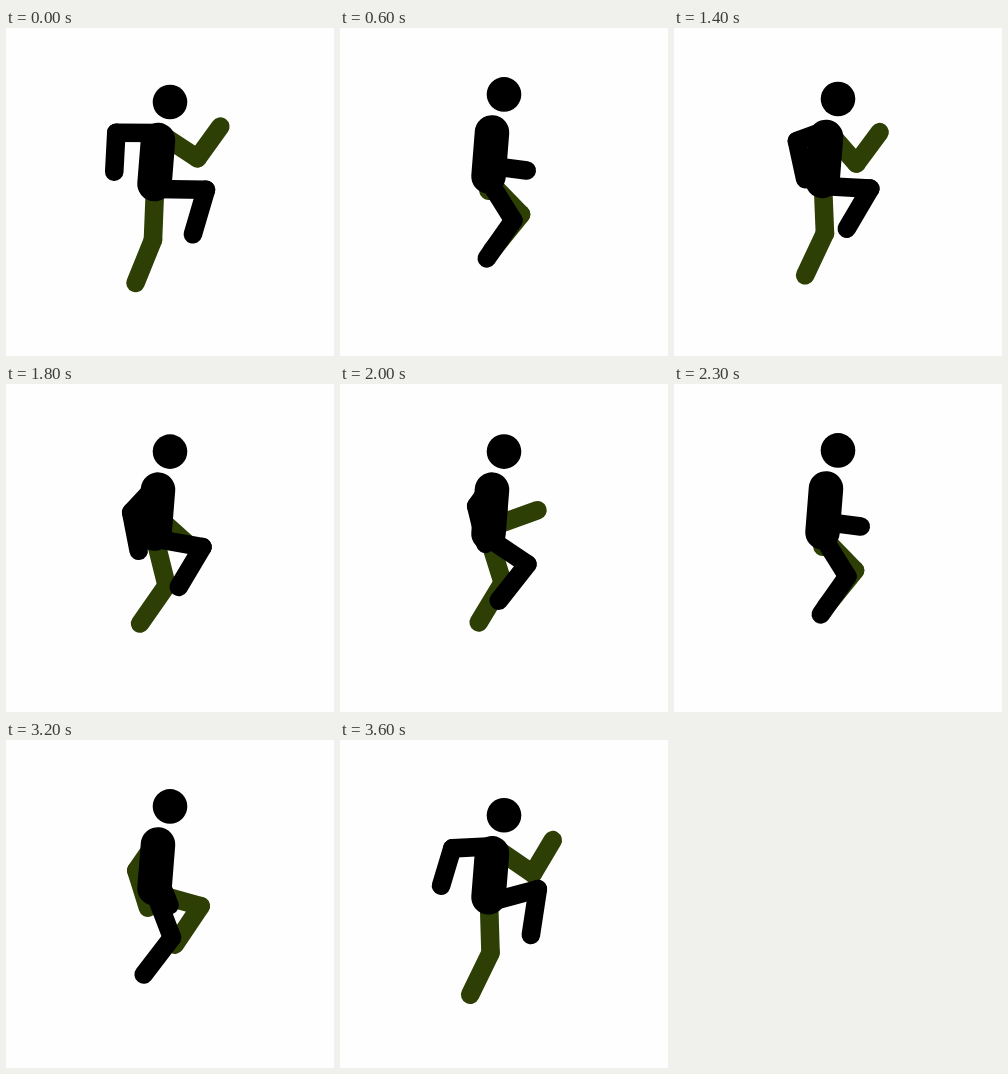
These frames come from a looping animation (328x328 px, 3700 ms). An HTML page without scripts:

```html
<!DOCTYPE html>
<html lang="en">
<head>
<meta charset="utf-8">
<title>Running figure</title>
<style>
@property --n { syntax: "<number>"; inherits: true; initial-value: 1.667; }

html, body { margin: 0; width: 100%; height: 100%; overflow: hidden; background: #fefefe; }
svg {
  display: block; width: 100vw; height: 100vh;
  animation: run 3.7s -5ms infinite;
}
/* --n counts tenths of a second; a stride takes 17/3 of them */
@keyframes run {
  0% { --n: 1.667; animation-timing-function: steps(2); }
  5.4054% { --n: 2; animation-timing-function: steps(35); }
  100% { --n: 37; }
}

.body, .near { --t: calc((var(--n) - 1) * 63.5294deg); }
.far { --t: calc((var(--n) - 1) * 63.5294deg + 180deg); }
.near { fill: #000; }
.far { fill: #2d3f04; }
.body { transform: translateY(calc(70.5px + 4.8px * cos(2 * var(--t) - 127deg))); }

/* Limb angles from straight down, forward positive */
.leg {
  --len: calc(48.5px + 2.5px * cos(2 * var(--t) - 95deg));
  --up: calc(45.6deg + 29.6deg * cos(var(--t)) + 45.5deg * sin(var(--t))
    - 3.25deg * cos(2 * var(--t)) + 3.5deg * sin(2 * var(--t))
    + 3.4deg * cos(3 * var(--t)) - 5.95deg * sin(3 * var(--t))
    + 4.6deg * cos(4 * var(--t)) - 4.5deg * sin(4 * var(--t)));
  --low: calc(-27.6deg + 3.1deg * cos(var(--t)) + 2.2deg * sin(var(--t))
    - 5.25deg * cos(2 * var(--t)) + 8.9deg * sin(2 * var(--t))
    - 3.4deg * cos(3 * var(--t)) - 1.3deg * sin(3 * var(--t))
    + 2.3deg * cos(5 * var(--t)));
}
.arm {
  --len: calc(39.5px + 3px * cos(var(--t)) - 5.7px * sin(var(--t))
    - 1.75px * cos(2 * var(--t)) + 5px * sin(2 * var(--t)));
  --up: calc(-17deg - 33deg * cos(var(--t)) - 62.4deg * sin(var(--t))
    - 3.25deg * cos(2 * var(--t)) - 1.75deg * sin(2 * var(--t))
    + 5.5deg * cos(3 * var(--t)) + 2.6deg * sin(3 * var(--t))
    - 2.25deg * cos(4 * var(--t)) + 7deg * cos(5 * var(--t)));
  --low: calc(55.6deg - 21.7deg * cos(var(--t)) - 79deg * sin(var(--t))
    - 21.8deg * cos(2 * var(--t)) + 10.5deg * sin(2 * var(--t))
    + 3.2deg * cos(3 * var(--t)) - 3deg * sin(3 * var(--t))
    - 4.3deg * cos(4 * var(--t)) + 12.5deg * sin(4 * var(--t)));
}
.up { transform: rotate(calc(-1 * var(--up))); }
.low { transform: translateY(var(--len)) rotate(calc(var(--up) - var(--low))); }
.up > rect { height: calc(var(--len) + 18.6px); }
</style>
</head>
<body>
<svg viewBox="0 0 328 328">
  <g class="body">
    <g class="far">
      <g class="leg" transform="translate(149 87)">
        <g class="up">
          <rect x="-9.3" y="-9.3" width="18.6" rx="9.3"/>
          <g class="low"><rect x="-9.3" y="-9.3" width="18.6" height="65" rx="9.3"/></g>
        </g>
      </g>
      <g class="arm" transform="translate(153 31)">
        <g class="up">
          <rect x="-9.3" y="-9.3" width="18.6" rx="9.3"/>
          <g class="low"><rect x="-9.3" y="-9.3" width="18.6" height="57.6" rx="9.3"/></g>
        </g>
      </g>
    </g>
    <g class="near">
      <circle cx="164" cy="0" r="17.3"/>
      <path d="M152 38L148.5 82" stroke="#000" stroke-width="34.5" stroke-linecap="round"/>
      <g class="leg" transform="translate(149 87)">
        <g class="up">
          <rect x="-9.3" y="-9.3" width="18.6" rx="9.3"/>
          <g class="low"><rect x="-9.3" y="-9.3" width="18.6" height="65" rx="9.3"/></g>
        </g>
      </g>
      <g class="arm" transform="translate(153 31)">
        <g class="up">
          <rect x="-9.3" y="-9.3" width="18.6" rx="9.3"/>
          <g class="low"><rect x="-9.3" y="-9.3" width="18.6" height="57.6" rx="9.3"/></g>
        </g>
      </g>
    </g>
  </g>
</svg>
</body>
</html>
```
